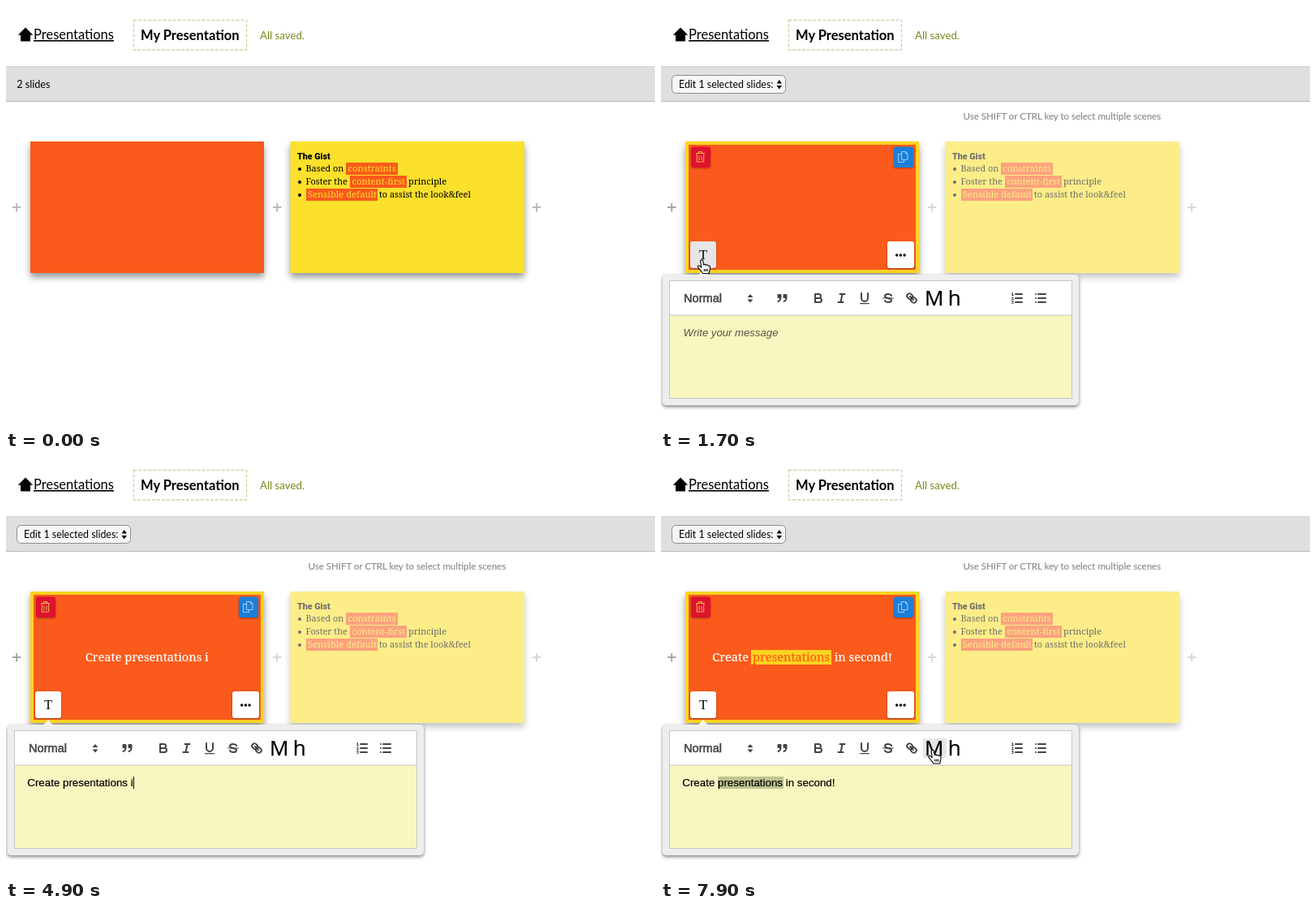
Animation, 800 px wide and 520 px high, one loop 8000 ms. Source, as an HTML page:

```html
<!DOCTYPE html>
<html lang="en">
<head>
<meta charset="utf-8">
<title>Slide editor</title>
<style>
html, body { margin: 0; width: 100%; height: 100%; overflow: hidden; background: #fff; }
svg { display: block; width: 800px; height: 520px; }
text { white-space: pre; }
.ui { font-family: Lato, sans-serif; }
.slab { font-family: "Noto Serif", serif; }
.edit { font-family: "Liberation Sans", Arial, sans-serif; font-size: 13.33px; }
.small { font-size: 10.9px; }
.mark { font-size: 11.2px; }
.lift { filter: drop-shadow(0 5px 4px rgba(0,0,0,.42)); }
.btn { filter: drop-shadow(0 1px 1px rgba(0,0,0,.35)); }
.icon { fill: none; stroke: #444; stroke-width: 2; stroke-linecap: round; stroke-linejoin: round; }
.icon .solid { fill: #444; stroke: none; }
.icon .thin { stroke-width: 1; }
.plus { stroke: #b9b9b9; stroke-width: 2; }
</style>
</head>
<body>
<svg viewBox="0 0 800 520">
  <rect width="800" height="520" fill="#fff"/>

  <g class="ui">
    <path d="M24 26.5L33.2 35.8H30V43.5H18V35.8H14.8Z"/>
    <text x="34" y="41" font-size="16.5" text-decoration="underline">Presentations</text>
    <rect x="157.5" y="17.5" width="139" height="36.5" fill="none" stroke="#d5d0a8" stroke-width="1.4" stroke-dasharray="4 2"/>
    <text x="166" y="42" font-size="16.5" font-weight="700">My Presentation</text>
    <text x="313" y="41" font-size="13.25" fill="#768a1c">All saved.</text>
    <rect y="74" width="800" height="44" fill="#dfdfdf"/>
    <path d="M0 74.5H800" stroke="#d3d3d3"/>
    <path d="M0 117.5H800" stroke="#b9b9b9"/>
    <text id="count" x="13.3" y="101" font-size="12.6">2 slides</text>
    <g id="picker">
      <rect x="13.5" y="85.5" width="140" height="22" rx="5" fill="#f6f6f6" stroke="#8d8d8d"/>
      <text x="22" y="101" font-size="12.4">Edit 1 selected slides:</text>
      <path d="M142.5 95.5L145.8 91L149 95.5ZM142.5 98L145.8 102.5L149 98Z"/>
    </g>
    <text id="hint" x="372.5" y="140" font-size="11.5" fill="#8b8b8b" stroke="#8b8b8b" stroke-width=".15">Use SHIFT or CTRL key to select multiple scenes</text>
  </g>

  <path id="plus0" class="plus" d="M8 248H18.5M13.2 243V253.5"/>
  <g id="other">
    <path class="plus" d="M329 248H339.5M334.2 243V253.5M649 248H659.5M654.2 243V253.5"/>
    <rect class="lift" x="350.5" y="167" width="288.5" height="162" fill="#fbe02c"/>
    <text x="359" y="189" font-family="Roboto, sans-serif" font-size="10.7" font-weight="900">The Gist</text>
    <g fill="#fa5a1b">
      <rect x="419" y="193" width="64" height="15"/>
      <rect x="424" y="209" width="70" height="15"/>
      <rect x="370" y="225" width="88" height="15"/>
    </g>
    <circle cx="362" cy="201" r="2"/><circle cx="362" cy="217" r="2"/><circle cx="362" cy="233" r="2"/>
    <g class="slab small">
      <text x="369.5" y="204">Based on</text>
      <text x="369.5" y="220">Foster the</text>
      <text x="496" y="220">principle</text>
      <text x="460" y="236">to assist the look&amp;feel</text>
      <g class="mark" fill="#fbe02c">
        <text x="421.5" y="204">constraints</text>
        <text x="426.5" y="220">content-first</text>
        <text x="372" y="236">Sensible default</text>
      </g>
    </g>
  </g>

  <rect class="lift" x="30" y="167" width="288" height="162" fill="#fa5a1b"/>
  <g id="tools">
    <path fill="#fed321" fill-rule="evenodd" d="M30 167H318V329H30ZM34 171V325H314V171Z"/>
    <g class="btn">
      <rect x="37" y="173.5" width="24" height="25.5" rx="3" fill="#df1230"/>
      <path d="M43 181.5H54M46.5 181V179.5H50.5V181M44.3 182V192H52.7V182M47 184.5V190M50 184.5V190" fill="none" stroke="#f6b94a"/>
    </g>
    <g class="btn">
      <rect x="287" y="173.5" width="24" height="25.5" rx="3" fill="#1a7fd8"/>
      <path d="M296 182.5H292.5V192.5H299.5V190M296.5 179.5H301.5L304 182V189.5H296.5ZM301.5 179.5V182H304" fill="none" stroke="#c9def0" stroke-width=".8"/>
    </g>
    <rect id="tBtn" class="btn" x="36" y="290" width="32" height="33" rx="3" fill="#fff"/>
    <text x="52" y="312" font-family="Liberation Serif, serif" font-size="16.5" text-anchor="middle">T</text>
    <rect class="btn" x="279" y="290" width="33" height="33" rx="3" fill="#fff"/>
    <circle cx="290.7" cy="307" r="1.7"/><circle cx="295.4" cy="307" r="1.7"/><circle cx="300.1" cy="307" r="1.7"/>
  </g>
  <g class="slab" font-size="14.6" fill="#fff" stroke="#fff" stroke-width=".2">
    <text id="title" x="173.7" y="253" text-anchor="middle"></text>
    <g id="marked">
      <rect x="111" y="239" width="99" height="18" fill="#fed321" stroke="none"/>
      <text x="63.2" y="253">Create</text>
      <text x="113" y="253" fill="#fa5a1b" stroke="#fa5a1b">presentations</text>
      <text x="213.7" y="253">in second!</text>
    </g>
  </g>

  <g id="tip">
    <rect x="12" y="257" width="77" height="28" rx="8"/>
    <path d="M45 284.5H58L51.5 291Z"/>
    <text class="ui" x="25" y="276" font-size="13" fill="#fff">Add Text</text>
  </g>

  <g id="editor">
    <rect x="1.5" y="331" width="513.5" height="161" rx="5" fill="#eee" style="filter:drop-shadow(0 2px 2px rgba(0,0,0,.5))"/>
    <path d="M46 331.5L52 325L58 331.5Z" fill="#f6f6f6"/>
    <rect x="10.5" y="338.5" width="496" height="42.5" fill="#fff"/>
    <rect x="10.5" y="381" width="496" height="103" fill="#f8f7c0"/>
    <path d="M10.5 338.5H506.5V483.5H10.5ZM10.5 381H506.5" fill="none" stroke="#c6c6c6"/>
    <text class="edit" x="28" y="365" style="font-size:14.6px" fill="#444" stroke="#444" stroke-width=".55">Normal</text>
    <g id="icons"></g>
    <rect id="mHover" x="323" y="348" width="29" height="24" fill="#e6e6e6"/>
    <g font-family="Open Sans, sans-serif" font-size="26" stroke="#000" stroke-width=".25">
      <text x="325" y="369">M</text>
      <text x="353.8" y="369">h</text>
    </g>
    <rect id="sel" x="70" y="395" width="81" height="15" fill="#bfc48f"/>
    <text id="holder" class="edit" x="27.5" y="407" style="font-size:13.16px" font-style="italic" fill="#55553f">Write your message</text>
    <text id="typed" class="edit" x="26.3" y="407" stroke="#000" stroke-width=".2"></text>
    <rect id="caret" y="395" width="1" height="15"/>
  </g>

  <g id="mouse">
    <path id="arrow" d="M0 0V15.5L3.7 12.2L6.2 18L8.8 16.9L6.3 11.2H11.2Z" stroke="#fff"/>
    <path id="hand" d="M-1.3 1.5C-1.3-.7 1.8-.7 1.9 1.5L2.6 6C3.6 5 5 5.2 5.4 6.5C6.4 5.6 7.8 6 8.2 7.2C9.4 6.7 10.4 7.4 10.5 8.8C10.8 11.5 9.6 13 9.3 16.5H1.2C.6 13.5-3 11.3-4.6 8.8C-5.3 7.2-3.5 6.3-2 7.6L-.3 9.2ZM3.3 11V14M5.3 11V14M7.3 11V14" fill="#fff" stroke="#000" stroke-width="1.1" stroke-linejoin="round"/>
    <path id="beam" d="M-3.5-7.5Q0-7.5 0-4.5Q0-7.5 3.5-7.5M0-5V5M-3.5 7.5Q0 7.5 0 4.5Q0 7.5 3.5 7.5M-1.8 1.5H1.8" fill="none" stroke="#000" stroke-width="1.3"/>
  </g>
</svg>
<script>
const $ = id => document.getElementById(id);
const LOOP = 8000, STEP = 100;
const MESSAGE = 'Create presentations in second!';

// Left edge of each 18px toolbar icon and its drawing
const ICONS = [
  [101, '<path class="solid" d="M5.5 8L9 4L12.5 8ZM5.5 10.5L9 14.5L12.5 10.5Z"/>'],
  [140.5, '<path class="solid" d="M4 5h3v3h-3zM11 5h3v3h-3z"/><path d="M4 5h3v3h-3zM11 5h3v3h-3zM7 8c0 4-3 5-3 5M14 8c0 4-3 5-3 5"/>'],
  [185, '<path d="M5 4H9.5A2.5 2.5 0 0 1 9.5 9H5ZM5 9H10.5A2.5 2.5 0 0 1 10.5 14H5Z"/>'],
  [213.5, '<path d="M7 4H13M5 14H11M8 14L10 4"/>'],
  [242, '<path d="M5 3V9a4 4 0 0 0 8 0V3"/><rect class="solid" x="3" y="15" width="12" height="1.3" rx=".5"/>'],
  [271, '<path d="M13 6C12 3.3 5 3 5 6.5C5 8 6.5 8.5 9 9S13 10 13 11.5C13 15 6 14.7 5 12"/><path class="thin" d="M2.5 9H15.5"/>'],
  [300, '<path d="M7 7L11 11M9 4.6a3.5 3.5 0 0 1 .3 4.7a3.5 3.5 0 0 1-4.7-.4C3.2 7.5 2 6.4 4.2 4.2S7.5 3.2 9 4.6ZM13.4 9.1a3.5 3.5 0 0 0-4.7-.4a3.5 3.5 0 0 0 .4 4.7c1.4 1.4 2.5 2.5 4.7.4S14.8 10.5 13.4 9.1Z"/>'],
  [430, '<path d="M7 4H15M7 9H15M7 14H15"/><path class="thin" d="M2.5 3L3.5 2.4V5.5M2.5 5.5H4.5M2.5 8Q3.5 7 4.3 8L2.5 10.5H4.5M2.5 12.5H4.4L3.5 14Q5 14.2 4.2 15.3H2.5"/>'],
  [459, '<path d="M6 4H15M6 9H15M6 14H15M3 4h.01M3 9h.01M3 14h.01"/>']
];
$('icons').innerHTML = ICONS.map(([x, art]) =>
  `<g class="icon" transform="translate(${x} 351)">${art}</g>`).join('');

// Rows are [time, value...], joined by straight segments
const KEYS = [[2900, 0], [3500, 3], [3700, 7], [3800, 7], [4300, 14], [4900, 22], [6200, 30], [6400, 31]];
const ENTER = [[100, 706, 449], [300, 640, 420], [600, 480, 378], [900, 345, 342], [1100, 200, 316],
  [1400, 50, 313], [1800, 50, 313], [2000, 58, 332], [2400, 97, 402]];
const PICK = [[6600, 165, 428], [7000, 112, 403], [7400, 112, 403], [7700, 334.5, 362.5]];

function along(rows, t) {
  const last = rows.length - 1;
  if (t <= rows[0][0]) return rows[0].slice(1);
  if (t >= rows[last][0]) return rows[last].slice(1);
  const i = rows.findIndex(r => r[0] > t);
  const a = rows[i - 1], b = rows[i];
  const k = (t - a[0]) / (b[0] - a[0]);
  return a.slice(1).map((v, j) => v + (b[j + 1] - v) * k);
}

const ramp = (t, from, span) => Math.min(1, Math.max(0, (t - from) / span));
const show = (id, on) => { $(id).style.display = on ? '' : 'none'; };
const mix = (a, b, k) => a + (b - a) * k;

function drawMouse(t) {
  const visible = (t >= 100 && t < 2800) || t >= 6600;
  show('mouse', visible);
  if (!visible) return;
  const [x, y] = along(t < 2800 ? ENTER : PICK, t);
  const open = t >= 1700;
  let kind = 'arrow';
  if (open && y > 381) kind = 'beam';
  else if (open ? y < 329 || (y > 345 && x > 140) : t >= 1000) kind = 'hand';
  for (const id of ['arrow', 'hand', 'beam']) show(id, id === kind);
  $('mouse').setAttribute('transform', `translate(${x.toFixed(1)} ${y.toFixed(1)})`);
}

function draw(t) {
  const hover = ramp(t, 900, 200), open = t >= 1700;
  $('other').style.opacity = mix(1, .56, hover);
  $('hint').style.opacity = $('tools').style.opacity = hover;
  $('plus0').style.stroke = hover ? '#a6a6a6' : '';
  show('count', !open);
  show('picker', open);
  show('editor', open);
  show('tip', t >= 1400 && !open);
  $('tBtn').setAttribute('fill', t >= 1400 && t < 1900 ? '#e6e6e6' : '#fff');

  const n = Math.floor(along(KEYS, t)[0] + 1e-6);
  const text = MESSAGE.slice(0, n);
  const selected = t >= 7100, marked = t >= 7800;
  $('typed').textContent = text;
  $('title').textContent = text.trimEnd();
  show('title', !marked);
  show('marked', marked);
  show('holder', n === 0);
  show('sel', selected);
  show('mHover', t >= 7700);
  show('caret', t >= 2800 && !selected);
  $('caret').setAttribute('x', 26.5 + (n ? $('typed').getComputedTextLength() : 0));
  drawMouse(t);
}

function tick() {
  const t = performance.now() % LOOP;
  draw(Math.floor(t / STEP) * STEP);
  requestAnimationFrame(tick);
}
tick();
</script>
</body>
</html>
```
